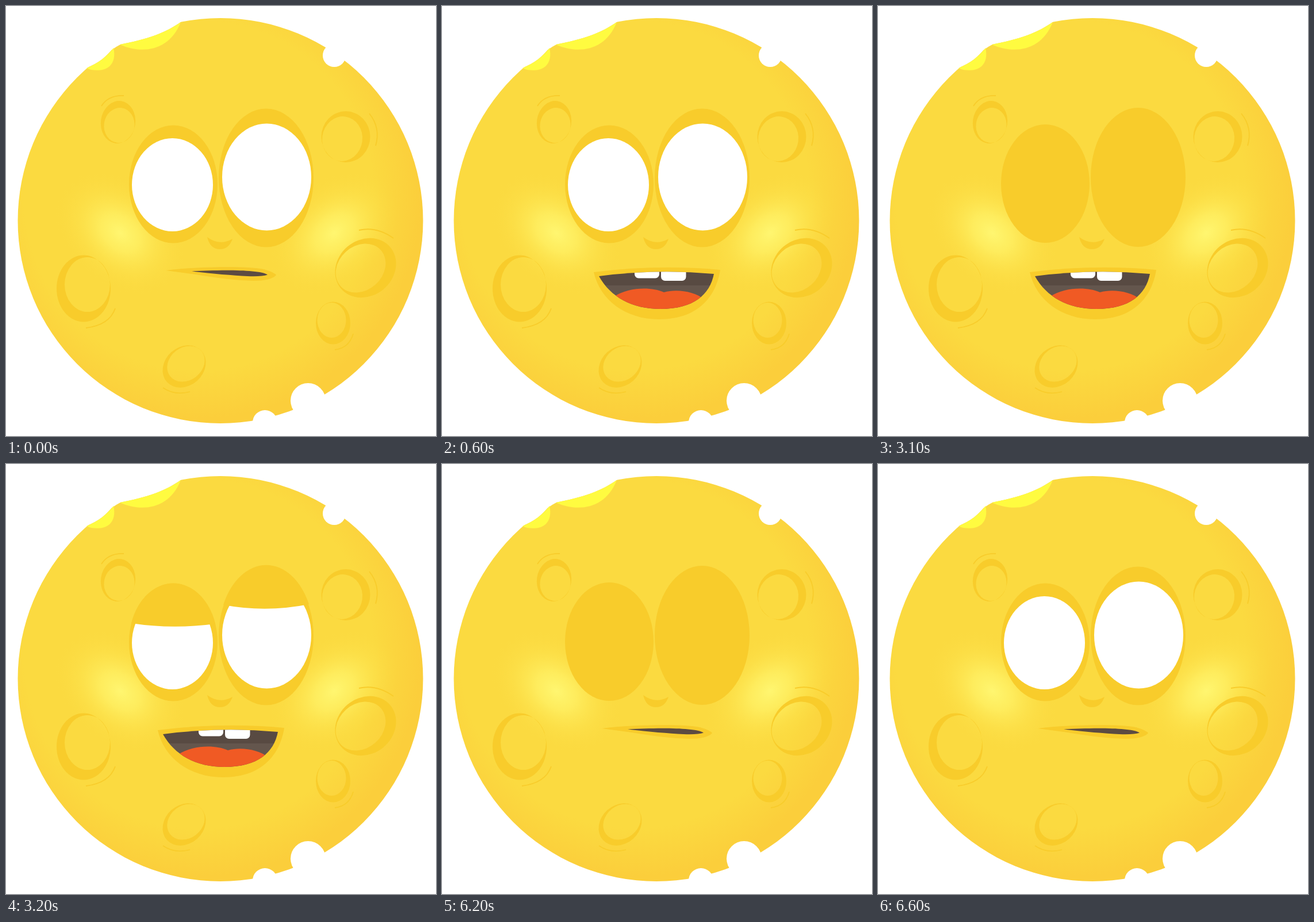
Recreate the animation shown at these times as an HTML page with a canvas. Size 748 by 748 pixels, loop 8000 ms.

```html
<!DOCTYPE html>
<html>
<head>
<meta charset="utf-8">
<title>Cheese moon</title>
<style>
html, body { margin: 0; height: 100%; overflow: hidden; background: #fff; }
canvas { display: block; }
</style>
</head>
<body>
<canvas id="stage" width="748" height="748"></canvas>
<script>
const ctx = document.getElementById('stage').getContext('2d');
const SHADE = '#f8cc2b';

function oval(x, y, rx, ry, tilt = 0) {
  const p = new Path2D();
  p.ellipse(x, y, rx, ry, tilt * Math.PI / 180, 0, Math.PI * 2);
  return p;
}

function fill(shape, color, rule = 'nonzero') {
  ctx.fillStyle = color;
  ctx.fill(typeof shape === 'string' ? new Path2D(shape) : shape, rule);
}

function radial(x, y, r, stops) {
  const g = ctx.createRadialGradient(x, y, 0, x, y, r);
  stops.forEach(([at, color]) => g.addColorStop(at, color));
  return g;
}

function glow(x, y, tilt) {
  ctx.save();
  ctx.translate(x, y);
  ctx.rotate(tilt * Math.PI / 180);
  ctx.scale(1.4, 1);
  fill(oval(0, 0, 92, 92), radial(0, 0, 92, [
    [0, 'rgba(255,246,112,1)'], [.3, 'rgba(255,243,104,.72)'],
    [.65, 'rgba(254,232,84,.3)'], [1, 'rgba(252,218,64,0)']
  ]));
  ctx.restore();
}

// Outer oval, inner oval, and the thin crease beside the crater
const craters = [
  [[195, 202, 30, 37, 8], [197, 207.5, 26.5, 30.5, 8], 'M166 174Q178 155 205 156'],
  [[591, 227.5, 42.5, 44.5], [585, 231, 35, 39, 8], 'M632 187Q652 212 643 243'],
  [[625.5, 455.5, 56, 48.5, -40], [617, 456, 47, 38.5, -42], 'M614 390Q645 383 674 404'],
  [[569, 551.5, 30, 37], [566.5, 546.5, 25, 30.5], 'M604 570Q597 595 572 598'],
  [[135, 491.5, 47, 58], [141.5, 484.5, 39.5, 47.5], 'M190 526Q180 555 139 560'],
  [[310, 627, 40.5, 33.5, -42], [313, 622.5, 35, 28.5, -38], 'M273 664Q293 678 320 671']
];

function drawMoon() {
  fill(oval(373, 373.5, 352.5, 352.5),
    radial(335, 330, 400, [[.76, '#fbda40'], [.97, '#fbce3b']]));
  glow(199, 395, 40);
  glow(571, 395, -40);

  for (const [outer, inner, crease] of craters) {
    const ring = oval(...outer);
    ring.addPath(oval(...inner));
    fill(ring, SHADE, 'evenodd');
    ctx.strokeStyle = SHADE;
    ctx.lineWidth = 1.8;
    ctx.stroke(new Path2D(crease));
  }

  // Bites out of the rim
  fill('M305 27C278 47 245 58 198 67L186 73C176 87 162 99 139 108L100 90L180 10L305 10Z', '#fff');
  fill('M304 28C284 79 236 84 198 67C245 58 278 47 304 28Z', '#fffb40');
  fill('M140 108C152 114 171 113 180 105C188 98 190 85 187 73C176 87 162 99 140 108Z', '#fffb40');
  fill(oval(571, 86, 20, 20), '#fff');
  fill(oval(525.5, 686.5, 30.5, 30.5), '#fff');
  fill(oval(450.5, 724.5, 21.5, 21.5), '#fff');

  fill('M350 402Q372 418 394 405Q388 423 372 423Q355 423 350 402Z', SHADE);
}

function drawEyes(eyes) {
  if (eyes === 'shut') {
    fill(oval(291, 309, 77, 103), SHADE);
    fill(oval(452.5, 298, 82.5, 121), SHADE);
    return;
  }
  fill(oval(291, 310, 77, 102.5), SHADE);
  fill(oval(452.5, 299, 82.5, 120.5), SHADE);
  fill(oval(289.5, 311, 70.5, 81), '#fff');
  fill(oval(453.5, 297.5, 77.5, 93), '#fff');
  if (eyes === 'half') {
    fill('M218 277Q290 288 364 278A77 102.5 0 0 0 218 277Z', SHADE);
    fill('M378 245Q452 259 527 244A82.5 120.5 0 0 0 378 245Z', SHADE);
  }
}

function drawMouth(open) {
  if (!open) {
    fill('M278 460C335 453 420 452 449 458Q466 463 470 468Q462 478 430 478Q388 477 330 467Z', SHADE);
    fill('M323 461.5C370 459 441 458 455 467.5Q445 471 420 470Q380 468 323 461.5Z', '#5c4b42');
    return;
  }
  fill('M264 463Q375 449 484 459C478 497 453 545 377 545C320 545 275 512 264 463Z', SHADE);
  ctx.save();
  ctx.clip(new Path2D('M273 470Q373 457 473 466C466 502 438 527 380 527C330 527 293 506 273 470Z'));
  fill('M260 450H490V486H260Z', '#584a42');
  fill('M260 486H490V540H260Z', '#64564d');
  fill('M300 505C325 489 364 488 386 498C408 492 438 496 456 510V540H300Z', '#f05a24');
  ctx.beginPath();
  ctx.roundRect(335, 450, 43, 23.5, 7);
  ctx.roundRect(381, 450, 43.5, 28, 7);
  ctx.fillStyle = '#fff';
  ctx.fill();
  ctx.restore();
}

const between = (t, from, to) => t >= from && t < to;

function frame(now) {
  const t = now % 8000;
  const blink = [500, 3100, 6200, 6500].some(start => between(t, start, start + 100));
  ctx.clearRect(0, 0, 748, 748);
  drawMoon();
  drawEyes(blink ? 'shut' : between(t, 2600, 5200) ? 'half' : 'open');
  drawMouth(between(t, 600, 5200));
  requestAnimationFrame(frame);
}

requestAnimationFrame(frame);
</script>
</body>
</html>
```
